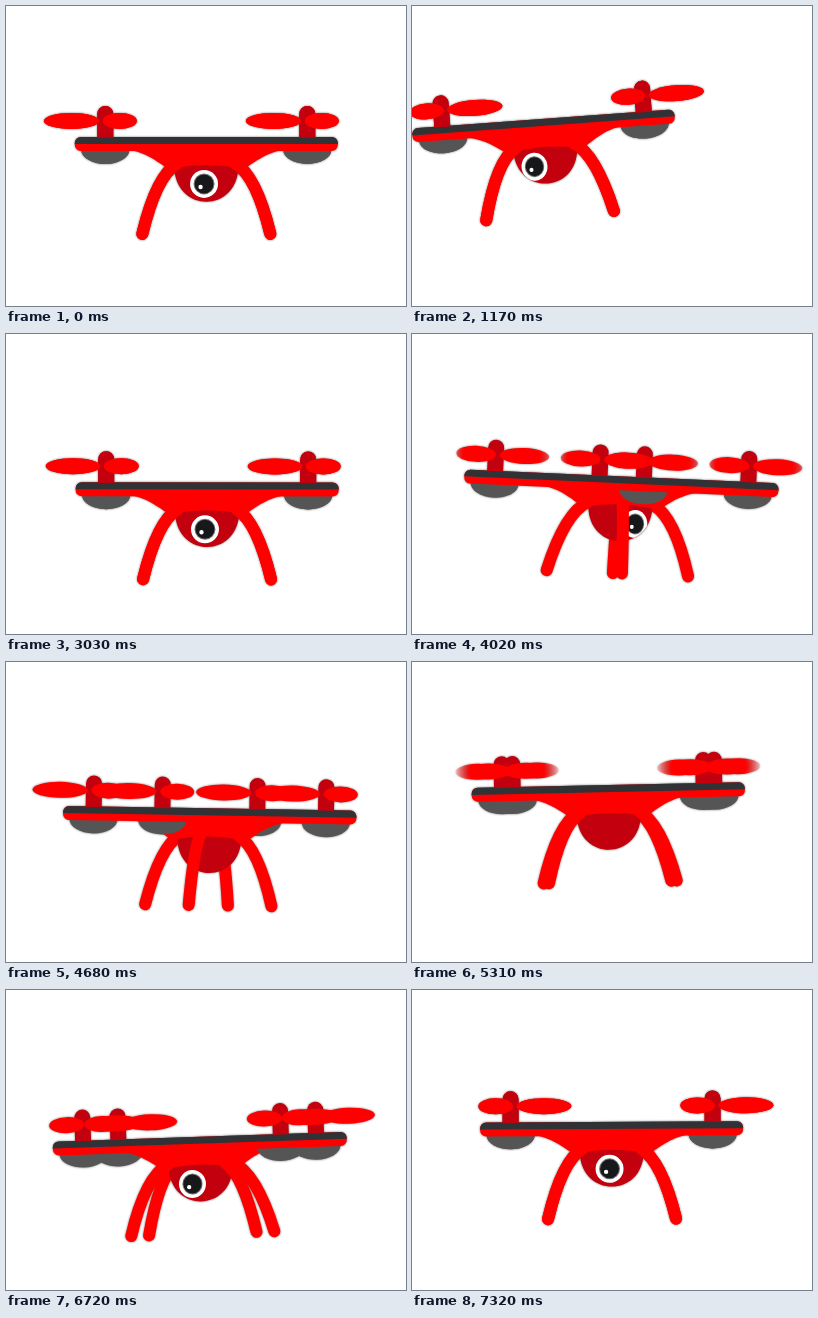
These frames come from a looping animation (400x300 px, 7.35 s). An HTML page with a canvas:

```html
<!DOCTYPE html>
<html lang="en">
<head>
<meta charset="utf-8">
<title>Drone</title>
<style>
html, body { margin: 0; width: 100%; height: 100%; overflow: hidden; background: #fff; }
canvas { display: block; width: 400px; height: 300px; filter: drop-shadow(0 0 .9px #777); }
</style>
</head>
<body>
<canvas id="stage" width="400" height="300"></canvas>
<script>
const ctx = document.getElementById('stage').getContext('2d');
const LOOP = 7350, STEP = 30, RAD = Math.PI / 180;
const RED = '#ff0000', DEEP = '#c3000d', DARK = '#303236', GREY = '#555';

// A smooth pulse of height 1, and a swing that peaks at -1 and then at +1
const bump = (t, mid, width) => Math.exp(-(((t - mid) / width) ** 2) / 2);
const wave = (t, mid, width) => (t - mid) / width * Math.exp(0.5) * bump(t, mid, width);

function flight(t) {
  const sway = 69 * wave(t, 1575, 400);
  const lean = 2.7 * bump(t, 4150, 380) - 3.9 * bump(t, 6100, 520);
  const lift = 28 * bump(t, 1600, 460) + 28 * bump(t, 5820, 330);
  const sink = 28 * bump(t, 2720, 320) + 22 * bump(t, 4400, 330) + 17 * bump(t, 6780, 220);
  const turn = 360 * Math.min(1, Math.max(0, (t - 3740) / 3080));
  return {
    x: sway + 3.5 * lean,
    y: sink - lift,
    tilt: sway / 16.5 + lean,
    yaw: turn + 28 * bump(t, 4080, 160), // quick kick into the turn
    eye: turn - 4 + sway * 0.26,
    swing: Math.cos(2 * Math.PI * t * 0.01154) ** 3
  };
}

function fill(color, draw) {
  ctx.beginPath();
  draw();
  ctx.fillStyle = color;
  ctx.fill();
}

const oval = (color, x, y, rx, ry = rx) =>
  fill(color, () => ctx.ellipse(x, y, rx, ry, 0, 0, 2 * Math.PI));

const pod = p => fill(GREY, () => ctx.ellipse(p.x, 6, 24, 14, 0, 0, Math.PI));

function leg(p) {
  const x = p.foot;
  ctx.beginPath();
  ctx.moveTo(x, 90);
  ctx.quadraticCurveTo(x * 0.78, 32, x * 0.46, 20);
  ctx.lineWidth = 12;
  ctx.lineCap = 'round';
  ctx.strokeStyle = RED;
  ctx.stroke();
}

function fuselage() {
  fill(RED, () => {
    ctx.moveTo(-82, 5);
    ctx.bezierCurveTo(-62, 8, -54, 14, -38, 25);
    ctx.lineTo(38, 25);
    ctx.bezierCurveTo(54, 14, 62, 8, 82, 5);
  });
}

function domePath() {
  ctx.moveTo(-32, 24);
  ctx.quadraticCurveTo(0, 18, 32, 24);
  ctx.bezierCurveTo(30, 69, -30, 69, -32, 24);
}

function camera(angle) {
  fill(DEEP, domePath);
  const c = Math.cos(angle * RAD);
  if (c <= 0) return;
  ctx.save();
  ctx.beginPath();
  domePath();
  ctx.clip();
  ctx.translate(32 * Math.sin(angle * RAD), 40);
  ctx.scale(c, 1);
  oval('#fff', 0, 0, 14);
  oval('#777', 0, 0, 10.5);
  oval('#161819', 0, 0, 9.5);
  oval('#fff', -3.5, 3, 2.2);
  ctx.restore();
}

function bar(half) {
  fill(RED, () => ctx.roundRect(-half, -7, 2 * half, 14, 6));
  fill(DARK, () => ctx.roundRect(-half, -7, 2 * half, 7, [6, 6, 0, 0]));
}

const post = p => fill(DEEP, () => ctx.roundRect(p.x - 8, -38, 16, 31.5, [8, 8, 0, 0]));

function blade(x, reach, side, blur) {
  const inner = (reach - 40) * 0.29;
  const tip = x + side * reach;
  const paint = ctx.createLinearGradient(x, 0, tip, 0);
  paint.addColorStop(0, RED);
  paint.addColorStop(1 - 0.35 * blur, RED);
  paint.addColorStop(1, `rgba(255,0,0,${1 - 0.85 * blur})`);
  oval(paint, x + side * (reach + inner) / 2, -23, (reach - inner) / 2, 8);
}

function rotor(p, swing) {
  const blur = 1 - Math.abs(swing);
  for (const side of [-1, 1]) blade(p.x, 46.5 - side * 15 * swing, side, blur);
}

// The four arms, farthest first
function armsAt(yaw) {
  const c = Math.cos(yaw * RAD), s = Math.sin(yaw * RAD), list = [];
  for (const i of [-1, 1]) {
    for (const j of [-1, 1]) {
      list.push({
        x: i * 101 * c + j * 87 * s,
        foot: i * 64 * c + j * 44 * s,
        depth: j * 87 * c - i * 101 * s
      });
    }
  }
  return list.sort((a, b) => a.depth - b.depth);
}

function render(time) {
  const t = time < 2 * STEP ? 0 : Math.floor(time / STEP) * STEP;
  const { x, y, tilt, yaw, eye, swing } = flight(t);
  const arms = armsAt(yaw), far = arms.slice(0, 2), near = arms.slice(2);

  ctx.setTransform(1, 0, 0, 1, 0, 0);
  ctx.clearRect(0, 0, 400, 300);
  ctx.translate(200.5 + x, 138 + y);
  ctx.rotate(tilt * RAD);

  far.forEach(pod);
  far.forEach(leg);
  fuselage();
  camera(eye);
  near.forEach(leg);
  near.forEach(pod);
  bar(Math.max(...arms.map(p => p.x)) + 30.5);
  arms.forEach(post);
  arms.forEach(p => rotor(p, swing));
}

const start = performance.now();
function tick() {
  render((performance.now() - start) % LOOP);
  requestAnimationFrame(tick);
}
tick();
</script>
</body>
</html>
```
